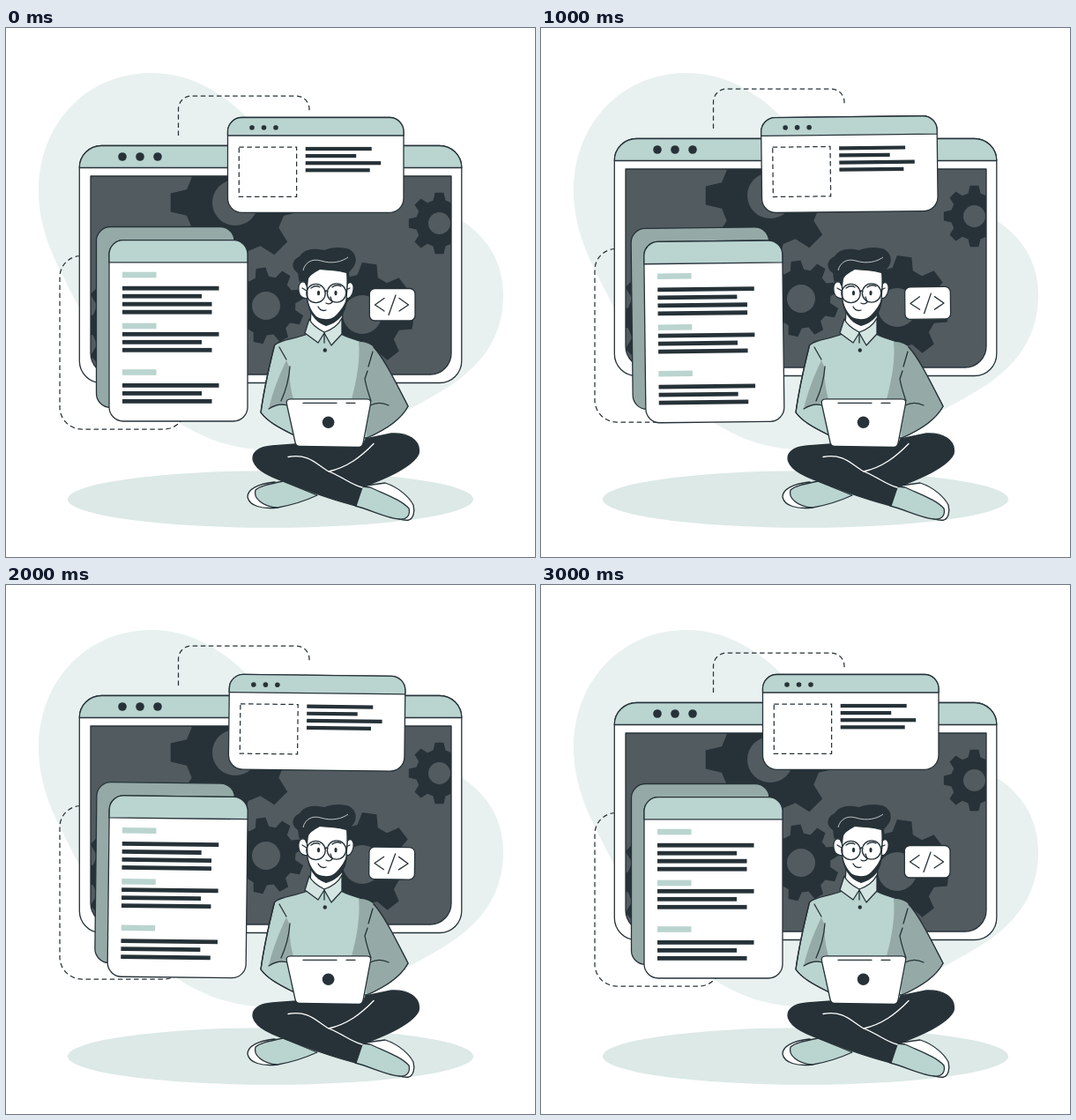
Write an HTML page that moves like this. It is 600 px wide and 600 px high and loops after 3.04 s.

```html
<!DOCTYPE html>
<html lang="en">
<head>
<meta charset="utf-8">
<title>Developer at work</title>
<style>
  html, body { margin: 0; width: 100%; height: 100%; overflow: hidden; background: #fff; }
  svg { display: block; width: 100vw; height: 100vh; }
  .line { stroke: #263238; stroke-width: 1.3; stroke-linecap: round; stroke-linejoin: round; }
  .dash { stroke: #263238; stroke-width: 1.25; stroke-dasharray: 5.5 3.6; fill: none; }
  .none { fill: none; }
  .white { fill: #fff; }
  .dark { fill: #263238; }
  .mint { fill: #bad4cf; }
  .pale { fill: #d5e5e2; }
  .shade { fill: #95aaa7; }
</style>
</head>
<body>
<svg viewBox="0 0 600 600">
  <defs>
    <clipPath id="screen"><path d="M96 168H505V369A24 24 0 0 1 481 393H120A24 24 0 0 1 96 369Z"/></clipPath>
  </defs>

  <path fill="#e8f1ef" d="M165 51C212 51 248 76 275 103C320 160 420 180 505 212C545 232 564 265 564 303C564 350 540 381 505 405C445 443 370 478 290 478C240 476 200 455 160 420C120 385 88 330 64 280C48 250 37 218 37 185C37 110 90 51 165 51Z"/>
  <ellipse cx="300" cy="534.5" rx="230" ry="32.3" fill="#dce9e6"/>

  <g id="monitor">
    <path class="dash" d="M195.5 122V92A15 15 0 0 1 210.500 77H329A15 15 0 0 1 344 92V94"/>
    <path class="dash" d="M84 258.500A24 24 0 0 0 61 282V430A25 25 0 0 0 86 455H179A25 25 0 0 0 204 430"/>
    <rect class="line white" x="83.300" y="133.500" width="433.500" height="269" rx="25"/>
    <path class="line mint" d="M83.300 158.500A25 25 0 0 1 108.300 133.500H491.800A25 25 0 0 1 516.800 158.500Z"/>
    <g class="dark">
      <circle cx="132" cy="146" r="4.800"/><circle cx="152" cy="146" r="4.800"/><circle cx="172" cy="146" r="4.800"/>
    </g>
    <g clip-path="url(#screen)">
      <rect x="96" y="168" width="409" height="225" fill="#525b60"/>
      <g id="gears" class="dark"></g>
    </g>
    <path class="line none" d="M96 168H505V369A24 24 0 0 1 481 393H120A24 24 0 0 1 96 369Z"/>
  </g>

  <g id="windows">
    <rect class="line shade" x="102.500" y="225.500" width="156.500" height="205" rx="16"/>
    <rect class="line white" x="117" y="240.700" width="157" height="205.300" rx="16"/>
    <path class="line mint" d="M117 265.800V256.700A16 16 0 0 1 133 240.700H258A16 16 0 0 1 274 256.700V265.800Z"/>
    <g id="page"></g>

    <rect class="line white" x="251.500" y="101.500" width="199.500" height="107.800" rx="16"/>
    <path class="line mint" d="M251.500 122V117.500A16 16 0 0 1 267.500 101.500H435A16 16 0 0 1 451 117.500V122Z"/>
    <g class="dark">
      <circle cx="279" cy="113" r="2.800"/><circle cx="292.500" cy="113" r="2.800"/><circle cx="306" cy="113" r="2.800"/>
    </g>
    <rect class="dash" x="264.300" y="135" width="65.300" height="56.300"/>
    <g id="note"></g>

    <rect class="line white" x="412.300" y="295.500" width="51.700" height="36.500" rx="6"/>
    <path class="line none" d="M429 306.500L418.500 314L429 321M442 303L434 325.500M446 306.500L456.500 314L446 321"/>
  </g>

  <g id="person">
    <!-- shirt -->
    <path class="line mint" d="M342 347C328 353 310 353 304.500 360C300 378 292 414 289 436C296 446 309 453 325 461L409 465C430 456 448 444 456 429C442 402 429 375 417 362C408 355 392 354 380 347Z"/>
    <path class="shade" d="M400 356C406 356 412 357 417 362C429 375 442 402 456 429C448 444 430 456 409 465L405 421H392C398 398 402 376 400 356Z"/>
    <path class="shade" d="M318 377C309 396 302 414 298 432C305 426 313 425 319 426L326 421C323 410 321 398 322 386Z"/>
    <path class="line none" d="M304.500 360C300 378 292 414 289 436C296 446 309 453 325 461M409 465C430 456 448 444 456 429C442 402 429 375 417 362M310 362L318 376M322 384C321 398 317 412 312 423M298 432C306 427 313 426 319 428M416 367L411 384M410 389L407 398C409 409 412 417 414 423M413 428C421 424 428 425 434 428"/>

    <!-- neck and collar -->
    <path class="line white" d="M346 322L345 337L361 346L381 335L382 320Z"/>
    <path class="line pale" d="M344 330L339 346L354 357L361 346L369 360L381 347L381 329C377 337 370 342 361 345C353 341 347 337 344 330Z"/>
    <path class="line none" d="M361 346V357"/>
    <circle class="dark" cx="361.800" cy="365.500" r="2.200"/>

    <!-- head -->
    <path class="line white" d="M341 290C335 285 331 290 332 298C333 305 338 308 343 306Z"/>
    <path class="line white" d="M387 290C392 286 395 291 394 297C393 304 389 308 386 306Z"/>
    <path class="line white" d="M341 276L342 309C344 321 350 332 363 337C376 331 385 321 386 309L388 274L368 266Z"/>
    <path class="dark" d="M341 305C343 314 347 322 351 326C355 331 369 332 374 326C380 320 385 313 387 304C387 320 381 333 363 338C350 334 342 321 341 305Z"/>
    <path class="dark" d="M340 292L338 287L333 288C331 283 332 280 331 278C321 271 326 262 333 259C339 249 353 250 361 252C371 247 388 249 391 252C398 257 398 266 394 271C392 274 390 276 389 277L390 288L387 292L386 278C376 275 366 275 356 274C349 278 344 281 343 285L342 293Z"/>
    <path class="none" stroke="#fff" stroke-width=".7" d="M337 275C339 266 347 261 357 264C370 268 381 265 388 260"/>
    <g class="line none">
      <circle cx="351.500" cy="301" r="10.700"/><circle cx="375" cy="300.500" r="10.700"/>
      <path d="M362 299Q363 297 365 299M341 298L336 295M385.500 297L390 295M346 295Q351 291 356 294M370 294Q375 290 380 293M368 305L370 311Q367 314 363 312M354 316Q357 322 363 320"/>
    </g>
    <ellipse class="dark" cx="354.500" cy="300.500" rx="1.600" ry="2.700"/>
    <ellipse class="dark" cx="374" cy="300.500" rx="1.600" ry="2.700"/>

    <!-- shoes -->
    <path class="line white" d="M304 515C286 517 274 523 274 532C276 542 290 546 308 544L322 520Z"/>
    <path class="line mint" d="M314 514C300 517 288 519 283 524C280 533 291 543 308 544C325 541 340 536 353 530Z"/>
    <path class="line white" d="M408 519L430 516C446 521 458 533 462 541C464 549 462 556 457 558C452 559 447 557 444 556Z"/>
    <path class="line mint" d="M404 520L396 542C415 547 432 556 446 557C454 558 459 553 457 545C448 535 430 529 413 521Z"/>

    <!-- legs -->
    <path class="line dark" d="M302 474C286 475 278 482 280.500 491C285 504 304 510 322 517C345 526 372 536 397 542L404 521C430 511 461 498 468 483C471 467 455 459 437 460L408 466L404 475L329 472Z"/>
    <path class="none" stroke="#fff" stroke-width="1.300" stroke-linecap="round" d="M320 486.500C344 482 353 496 366 503C382 509 391 518 404 521M366 503C387 498 402 487 417 471.500"/>

    <!-- laptop -->
    <path class="line white" d="M323 420.800H409Q414.500 420.800 413.500 426L405 471Q404 475.500 400 475.500L333 474.500Q329 474.500 328 470L318.300 426Q317.500 420.800 323 420.800Z"/>
    <path class="line none" d="M337 425.300H375M386 425.300H396"/>
    <circle class="dark" cx="365.600" cy="447.300" r="6.800"/>
  </g>
</svg>
<script>
const byId = id => document.getElementById(id);
const LOOP = 3040, FLOAT = 3000, SWAY = 1500, FPS = 24;

// Gear with evenly spaced tapered teeth and a round hole.
function gear(x, y, outer, hole, turn, teeth = 8) {
  const body = outer * 0.77, pitch = 360 / teeth, points = [];
  for (let i = 0; i < teeth; i++) {
    for (const [radius, offset] of [[body, -1 / 3], [outer, -0.18], [outer, 0.18], [body, 1 / 3]]) {
      const a = (turn + (i + offset) * pitch) * Math.PI / 180;
      points.push((x + radius * Math.cos(a)).toFixed(1) + " " + (y + radius * Math.sin(a)).toFixed(1));
    }
  }
  return `<path d="M${points.join("L")}Z"/><circle cx="${x}" cy="${y}" r="${hole}" fill="#525b60"/>`;
}

const bar = (x, y, width, height, tone) =>
  `<rect class="${tone}" x="${x}" y="${y - height / 2}" width="${width}" height="${height}"/>`;

byId("gears").innerHTML =
  gear(260, 198, 74, 26, 0) + gear(295, 315, 43.5, 16, -18, 9) + gear(404, 325, 59, 22, 8) +
  gear(491.5, 221.5, 35, 12.5, 0) + gear(142, 337, 58, 20, 0);

// Each paragraph: title height, first row height, row widths.
const paragraphs = [
  [280, 295.2, [109.5, 90, 101.5, 101.5]],
  [338, 347.3, [109.5, 90, 101.5]],
  [390.5, 405.4, [109.5, 90, 101.5]]
];
byId("page").innerHTML = paragraphs.map(([title, first, widths]) =>
  bar(132, title, 38.5, 6.6, "mint") +
  widths.map((width, i) => bar(132, first + i * 9, width, 4.8, "dark")).join("")).join("");
byId("note").innerHTML =
  [75, 57.5, 85.5, 73].map((width, i) => bar(339.7, 137 + i * 8.1, width, 4.2, "dark")).join("");

function sway(p) {
  return p < 0.25 ? 4 * p : p < 0.75 ? 2 - 4 * p : 4 * p - 4;
}

function draw(now) {
  const step = Math.floor((now % LOOP + 5) * FPS / 1000);
  const t = Math.min(step * 1000 / FPS, FLOAT);
  const lift = 12 * (1 - Math.abs(2 * t / FLOAT - 1));
  byId("monitor").setAttribute("transform", `translate(0 ${-lift})`);
  byId("windows").setAttribute("transform", `rotate(${sway(t % SWAY / SWAY)} 283 273.5)`);
}

const start = performance.now();
function tick() {
  draw(performance.now() - start);
  requestAnimationFrame(tick);
}
tick();
</script>
</body>
</html>
```
